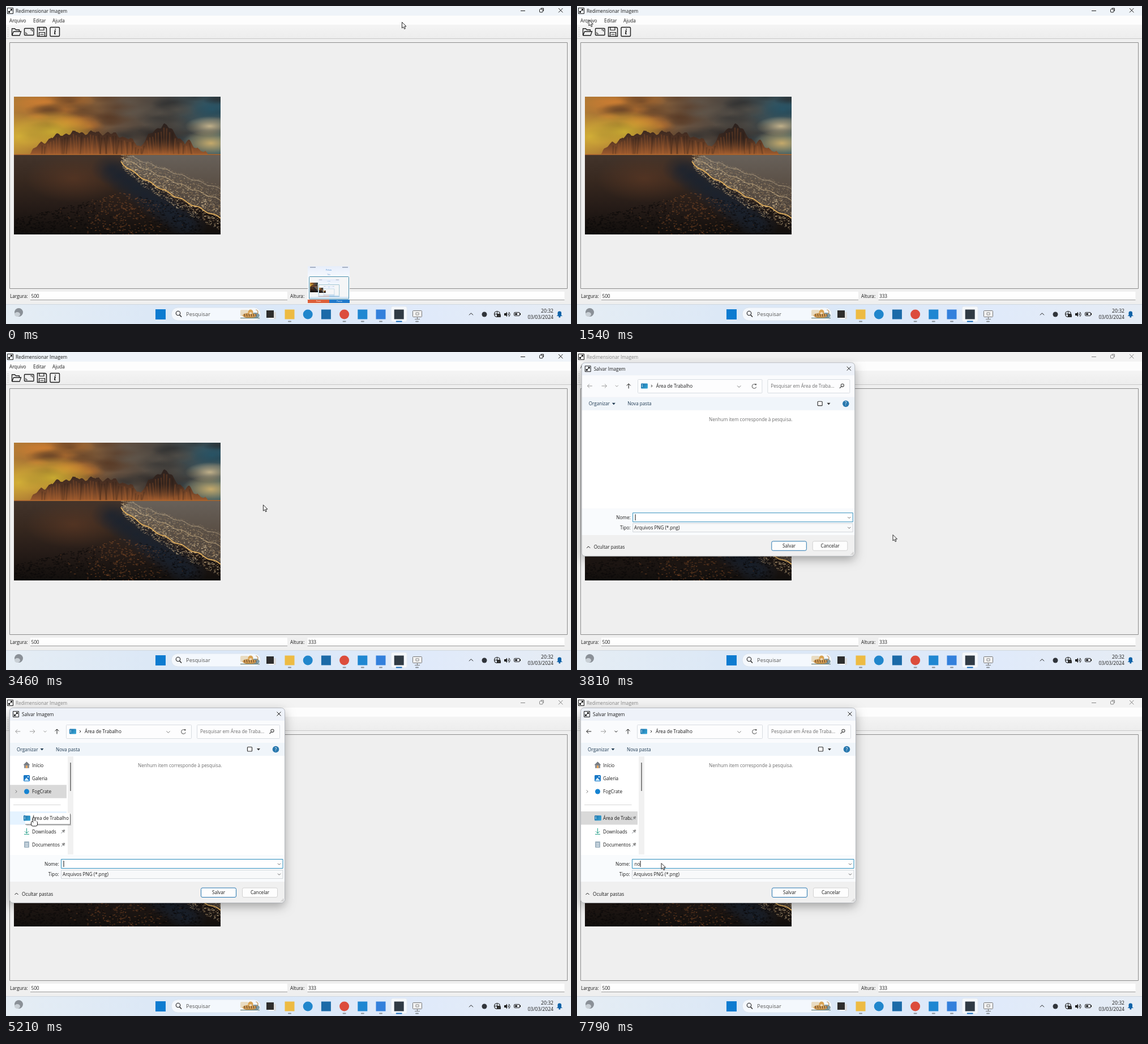
An HTML page with a canvas for the animation above (7.99 s loop, 998 by 561 pixels).

```html
<!DOCTYPE html>
<html lang="pt-BR">
<head>
<meta charset="utf-8">
<title>Redimensionar Imagem</title>
<style>
html, body { margin: 0; width: 100%; height: 100%; overflow: hidden; background: #f0f0f0; }
canvas { display: block; width: 100%; height: 100%; }
</style>
</head>
<body>
<canvas id="stage" width="998" height="561"></canvas>
<script>
let c = document.getElementById('stage').getContext('2d');
const LOOP = 7990, TAU = Math.PI * 2;
const FONT = '"Open Sans", "Noto Sans", sans-serif';
const INK = '#1b1b1b', GREY = '#8b8b8b';

const clamp = u => Math.min(1, Math.max(0, u));
const ease = u => u * u * (3 - 2 * u);
const rand = n => { const r = Math.sin(n * 127.1 + 11.7) * 43758.5453; return r - Math.floor(r); };

// Drawing helpers
function text(s, x, y, color = INK, size = 8.2, align = 'left') {
  c.font = size + 'px ' + FONT;
  c.textAlign = align;
  c.fillStyle = color;
  c.fillText(s, x, y);
}
function rect(x, y, w, h, color) {
  c.fillStyle = color;
  c.fillRect(x, y, w, h);
}
function box(x, y, w, h, r, fill, stroke, lw = 1) {
  c.beginPath();
  c.roundRect(x, y, w, h, r);
  if (fill) { c.fillStyle = fill; c.fill(); }
  if (stroke) { c.strokeStyle = stroke; c.lineWidth = lw; c.stroke(); }
}
function disc(x, y, rx, color, ry = rx) {
  c.beginPath();
  c.ellipse(x, y, rx, ry, 0, 0, TAU);
  c.fillStyle = color;
  c.fill();
}
function arc(x, y, r, color = INK, from = 0, to = TAU) {
  c.beginPath();
  c.arc(x, y, r, from, to);
  c.strokeStyle = color;
  c.lineWidth = 1.1;
  c.stroke();
}
function trace(p) {
  c.beginPath();
  for (let i = 0; i < p.length; i += 2) c.lineTo(p[i], p[i + 1]);
}
function line(p, color = INK, w = 1) {
  trace(p);
  c.strokeStyle = color;
  c.lineWidth = w;
  c.stroke();
}
function fill(p, color) {
  trace(p);
  c.fillStyle = color;
  c.fill();
}
function at(x, y, k, draw) {
  c.save();
  c.translate(x, y);
  c.scale(k, k);
  draw();
  c.restore();
}
function gradient(x0, y0, x1, y1, ...stops) {
  const g = c.createLinearGradient(x0, y0, x1, y1);
  stops.forEach((s, i) => g.addColorStop(i / (stops.length - 1), s));
  return g;
}
function glow(x, y, r, rgb, a, squash = .5) {
  c.save();
  c.translate(x, y);
  c.scale(1, squash);
  const g = c.createRadialGradient(0, 0, 0, 0, 0, r);
  g.addColorStop(0, `rgba(${rgb},${a})`);
  g.addColorStop(1, `rgba(${rgb},0)`);
  disc(0, 0, r, g);
  c.restore();
}
function chevron(x, y, color = INK, angle = 0, r = 2.5) {
  c.save();
  c.translate(x, y);
  c.rotate(angle);
  line([-r, -r / 2, 0, r / 2, r, -r / 2], color);
  c.restore();
}
function arrow(x, y, angle, len, color = INK) {
  c.save();
  c.translate(x, y);
  c.rotate(angle);
  line([-len / 2, 0, len / 2, 0], color);
  line([len / 2 - 3.5, -3.5, len / 2, 0, len / 2 - 3.5, 3.5], color);
  c.restore();
}
function cross(x, y, r, color = INK) {
  line([x - r, y - r, x + r, y + r], color);
  line([x + r, y - r, x - r, y + r], color);
}
function triangle(x, y, color) {
  fill([x - 3, y, x + 3, y, x, y + 3.5], color);
}

// Landscape, painted once in its own 365 x 243 space
const HORIZON = 102;
const ridge = x => {
  const massif = 38 * (1 - Math.abs((x - 132) / 105) ** 3);
  const peak = 52 * (1 - Math.abs((x - 264) / 52) ** 1.3);
  const foot = 22 * (1 - Math.abs((x - 308) / 32));
  const jag = 2.5 * Math.sin(x * .19) + 2 * Math.sin(x * .43) + rand(x) * 2;
  return HORIZON - Math.max(0, Math.max(massif, peak, foot) + jag);
};
const shore = u => 114 + 100 * u ** .8 + 1.5 * Math.sin(u * 38);
const reach = u => 12 + 45 * Math.sqrt(u);

function wave(lift, color, w) {
  c.beginPath();
  for (let u = 0; u <= 1.01; u += .02) c.lineTo(189 + 176 * u, shore(u) - lift * reach(u));
  c.strokeStyle = color;
  c.lineWidth = w;
  c.stroke();
}
function paintSky() {
  rect(0, 0, 365, HORIZON, gradient(0, 0, 365, 0, '#ad7935', '#9e662f', '#65503f', '#444341', '#315766'));
  for (let i = 0; i < 60; i++) {
    const x = rand(i) * 365, y = rand(i + .3) * 75;
    const warm = x < 190;
    const light = rand(i + .6) > .55;
    const tone = warm ? (light ? '212,128,50' : '86,56,36') : (light ? '96,88,78' : '42,43,44');
    glow(x, y, 22 + rand(i + .8) * 26, tone, .5, .35);
  }
  glow(70, 62, 75, '212,184,50', .85);
  glow(8, 70, 60, '218,184,56', .85, .7);
  glow(350, 22, 40, '38,86,106', .8);
  glow(346, 52, 44, '200,182,142', .95, .4);
  glow(348, 82, 52, '204,174,108', .95, .45);
}
function paintMountains() {
  c.beginPath();
  c.moveTo(28, HORIZON);
  for (let x = 28; x <= 342; x += 2) c.lineTo(x, ridge(x));
  c.lineTo(342, HORIZON);
  c.fillStyle = gradient(0, 45, 0, HORIZON, '#2a211f', '#4e3122', '#9c5a2e');
  c.fill();
  glow(262, 72, 50, '30,25,25', .75, .55);
  for (let x = 50; x < 320; x += 5) {
    const top = ridge(x);
    line([x, top + 6, x + 8 * rand(x + .5) - 4, HORIZON], rand(x) > .5 ? 'rgba(30,22,20,.22)' : 'rgba(185,105,52,.22)', 2.5);
  }
}
function paintBeach() {
  rect(0, HORIZON, 365, 142, gradient(0, HORIZON, 0, 243, '#43342b', '#37281f', '#251b17', '#110e0c'));
  glow(105, 144, 85, '98,58,36', .6);
  for (let s = 0; s < 10; s++) glow(172 + 15 * s, 128 + 11 * s, 36, '24,34,48', .7, .75);
  c.beginPath();
  c.moveTo(365, HORIZON + 1);
  c.lineTo(206, HORIZON + 1);
  for (let u = 0; u <= 1.01; u += .02) c.lineTo(189 + 176 * u, shore(u));
  c.fillStyle = gradient(0, HORIZON, 0, 210, '#68615a', '#5a4f45', '#493f38');
  c.fill();
}
function paintTexture() {
  for (let i = 0; i < 1500; i++) {
    const u = rand(i), v = rand(i + .37) * 1.4 - .4;
    const tone = rand(i + .7) > .5 ? '228,204,160' : '168,138,98';
    const a = .75 * (1 - Math.abs(v) * .7);
    rect(189 + 176 * u, shore(u) - v * reach(u), 1 + 2 * rand(i + .9), 1, `rgba(${tone},${a})`);
  }
  wave(0, '#dfad5c', 1.8);
  wave(.55, 'rgba(214,186,140,.5)', 1.5);
  wave(.9, 'rgba(206,184,150,.45)', 1.2);
  for (let i = 0; i < 1100; i++) {
    const x = rand(i + .2) * 330, depth = rand(i + .45);
    const y = 243 - depth * (75 - Math.abs(x - 190) * .25);
    const brown = rand(i + .6) < Math.exp(-(((x - 190) / 55) ** 2));
    rect(x, y, 1 + 3 * rand(i + .8), 1.4, brown ? 'rgba(146,84,42,.45)' : 'rgba(10,9,9,.6)');
  }
}
function makePhoto() {
  const layer = document.createElement('canvas'), stage = c;
  layer.width = 365;
  layer.height = 243;
  c = layer.getContext('2d');
  paintSky();
  paintMountains();
  paintBeach();
  paintTexture();
  rect(0, HORIZON - .7, 365, 1.4, '#bd702f');
  c = stage;
  return layer;
}
const photo = makePhoto();

// Icons
function resizeIcon(x, y) {
  box(x + .5, y + .5, 10, 10, 0, null, INK);
  line([x + 3, y + 8, x + 8, y + 3]);
  rect(x + 6, y + 2, 3, 3, INK);
  rect(x + 2, y + 6, 3, 3, INK);
}
function folderIcon() {
  line([1, 14, 1, 2, 6, 2, 8, 4, 14, 4, 14, 7], INK, 1.3);
  line([1, 14, 4, 7, 17, 7, 14.5, 14, 1, 14], INK, 1.3);
}
function floppyIcon() {
  box(1, 1, 16, 16, [0, 3, 0, 0], null, INK, 1.4);
  box(4.5, 1, 8, 5, 0, null, INK, 1.2);
  box(4, 10, 10, 7, 0, null, INK, 1.2);
  line([6, 13.5, 12, 13.5]);
}
function desktopIcon(x, y) {
  box(x, y, 12, 9, 1.2, gradient(x, y, x + 12, y + 9, '#1b6fa8', '#38a9d8'));
  for (const dy of [2, 4.5]) rect(x + 1.5, y + dy, 1.5, 1.5, '#d5f0fb');
}
function pin(x, y) {
  line([x - 3.5, y + 3.5, x, y], '#808890');
  line([x - 2, y - 2, x + 2, y + 2], GREY, 1.5);
  line([x, y, x + 2.5, y - 2.5], GREY, 3);
}

function mainWindow(active) {
  const ink = active ? INK : '#858585';
  rect(0, 0, 998, 561, '#efefef');
  rect(0, 0, 998, 17, active ? '#eff4f9' : '#f3f3f3');
  resizeIcon(2, 3);
  text('Redimensionar Imagem', 17, 11.5, ink);
  line([909, 8.5, 917, 8.5], ink);
  box(942.5, 5.5, 5.5, 5.5, 1, null, ink);
  line([944.5, 4, 949.5, 4, 949.5, 9], ink);
  cross(979.7, 7.7, 3.7, ink);

  rect(0, 17, 998, 16, '#fdfdfd');
  text('Arquivo', 6, 28.5);
  text('Editar', 48, 28.5);
  text('Ajuda', 82, 28.5);
  rect(0, 33, 998, 24, gradient(0, 33, 0, 57, '#f4f4f4', '#ededed'));
  rect(0, 57, 998, 1, '#c9c9c9');
  for (let y = 38; y < 54; y += 3) rect(3, y, 1, 1, '#aaa');
  at(9.5, 38, 1, folderIcon);
  box(32.5, 39.5, 16.5, 12, 1, null, INK, 1.4);
  line([35, 46, 35, 49, 38, 49]);
  line([43, 42, 46.5, 42, 46.5, 45]);
  at(54.5, 36.5, 1, floppyIcon);
  box(78, 37.5, 16.5, 16, 1.5, null, INK, 1.4);
  c.font = 'italic bold 12px "Noto Serif", serif';
  c.textAlign = 'center';
  c.fillStyle = INK;
  c.fillText('i', 86.3, 50);

  box(6.5, 64.5, 985, 434, 0, '#efefef', GREY);
  c.drawImage(photo, 14, 160);
  text('Largura:', 7, 514.5);
  text('Altura:', 502, 514.5);
  for (const [x, s] of [[43, '500'], [532.5, '333']]) {
    rect(x, 504, 454, 15, '#fefefe');
    rect(x, 518, 454, 1, '#999');
    text(s, x + 1.5, 514.5);
  }
}

function searchBox() {
  box(292, 532, 158, 23, 11.5, '#f4f8fd', '#dbe4ee');
  arc(304, 542, 3.7);
  line([306.7, 545, 310, 548.5], INK, 1.3);
  text('Pesquisar', 318, 547, '#555', 9.4);
  // Tiger resting on leaves
  box(414, 536, 14, 11, 2, '#e9dcc2');
  disc(440, 546, 8, '#7d9aa6', 5);
  disc(430, 546, 12, '#cf9a52', 4.5);
  disc(432, 540, 4.5, '#d8a252');
  disc(432, 542, 2.5, '#f2dfc0', 1.8);
  for (let x = 421; x < 442; x += 4) line([x, 543, x + 1, 548], '#5a3f2a');
  arc(441, 540, 4, '#b9803d', -1.5, 1.5);
  line([414, 550.5, 448, 550.5], '#4f6a60');
}
function tray() {
  chevron(821.5, 543.5, INK, Math.PI, 3.5);
  disc(845, 544, 4.5, '#30343a');
  arc(867.5, 543.5, 5);
  line([862.5, 543.5, 872.5, 543.5]);
  line([867.5, 538.5, 867.5, 548.5]);
  rect(868, 544, 6, 5, '#333');
  rect(880, 542, 3, 4, INK);
  fill([881, 544, 885, 539.5, 885, 548.5], INK);
  for (const r of [2, 4.5]) arc(885.5, 544, r, INK, -1, 1);
  box(897.5, 540.5, 10, 6, 1.5, null, INK);
  rect(899, 542, 4, 3, INK);
  rect(908, 542, 1, 3, INK);
  text('20:32', 967, 540.5, INK, 8.6, 'right');
  text('03/03/2024', 967, 551.5, INK, 8.6, 'right');
  box(974.5, 538.5, 6.5, 8, [3, 3, 0, 0], '#0e62a8');
  rect(973, 546, 9.5, 1, '#0e62a8');
  disc(977.8, 548, 1.7, '#0e62a8');
}
const APPS = ['#edbb43', '#2086cc', '#1b6aa8', '#dc4c3c', '#1f87d2', '#3380dc', '#303a44'];
const ROUND = [1, 3], IDLE = [1, 2];
function taskbar() {
  rect(0, 526, 998, 35, gradient(0, 0, 998, 0, '#e5edf4', '#dce8f6', '#dbe8f8', '#e0eafa', '#e6ecf4'));
  rect(0, 526, 998, 1, '#d0d8e0');
  disc(22.5, 540.5, 7.5, '#8a9097');
  disc(20, 544, 5, '#c9d0d6', 4);
  rect(264, 535, 18, 18, '#0d7bd0');
  searchBox();
  rect(464, 540, 13, 12, '#fafafa');
  rect(460, 537, 13, 13, '#2d2d2d');
  rect(473, 540, 4, 12, '#dcdcdc');

  APPS.forEach((color, i) => {
    const x = 501 + 32.2 * i, last = i === APPS.length - 1;
    if (last) box(x - 14, 530, 28, 27, 3, '#f5f8fc', '#e3e9f0');
    box(x - 8.5, 535.5, 17, 17, ROUND.includes(i) ? 8.5 : 0, color);
    const w = last ? 11 : 6;
    if (!IDLE.includes(i)) box(x - w / 2, 555.5, w, 2, 1, last ? '#1369b8' : '#888f96');
  });
  box(718.5, 537.5, 16, 11, 1, '#f2f2f2', '#777');
  box(724, 541, 5, 4, 0, null, '#888');
  line([726.5, 549, 726.5, 552], '#777');
  line([722, 552.5, 731, 552.5], '#777');
  box(723, 555.5, 6, 2, 1, '#888f96');
  tray();
}

// Small recorder window that shows itself inside its own screen
function preview(depth) {
  rect(0, 0, 74, 65, gradient(0, 0, 0, 21, '#e6edfa', '#f8fbff'));
  for (const x of [4, 61]) rect(x, 1.5, 10, 1, '#6b7892');
  text('Prévia', 37, 8, '#3f86cf', 3.6, 'center');
  text('Tela', 37, 16, '#6c9ed0', 3, 'center');
  box(2.5, 18.5, 70, 39.5, 1, '#f5f6f7', '#4b8fab');
  c.drawImage(photo, 4, 29, 15, 17);
  if (depth) at(18, 23, .52, () => preview(depth - 1));
  rect(3, 54, 69, 3, '#d6e7f5');
  rect(0, 59, 38, 6, '#dc5f39');
  rect(38, 59, 36, 6, '#2079cb');
  text('Parar', 19, 63.3, '#fff', 3.4, 'center');
  text('Pausa', 56, 63.3, '#fff', 3.4, 'center');
}
function recorder(t) {
  if (t >= 140) return;
  const u = clamp(t / 210);
  c.globalAlpha = 1 - u;
  at(533 + u * 15, 459 + u * 53, 1 - u * .4, () => preview(2));
  c.globalAlpha = 1;
}

function menu(t) {
  if (t < 2000 || t >= 3110) return;
  rect(4, 36, 116, 38, 'rgba(0,0,0,.18)');
  box(2.5, 34.5, 115, 37, 0, '#f2f2f2', '#9a9a9a');
  line([3, 72, 118, 72, 118, 35], '#777');
  if (t >= 2410) rect(3, t < 2900 ? 35 : 53, 111, 17.5, '#91c9f7');
  at(4, 38, .7, folderIcon);
  at(4, 54.5, .7, floppyIcon);
  ['Abrir', 'Salvar'].forEach((s, i) => {
    text(s, 25, 47 + 17.5 * i);
    text('Ctrl+' + 'OS'[i], 78, 47 + 17.5 * i);
  });
}

// Folder list of the dialog
const ROW = 23.4;
const rowY = i => 118.2 + ROW * i;
const PLACES = [
  ['Início', y => {
    rect(32, y - 1, 9, 6.5, '#8b9096');
    fill([30.5, y, 36.5, y - 6, 42.5, y], '#777c82');
    rect(35, y + 1, 3, 4.5, '#f1a85a');
  }],
  ['Galeria', y => {
    box(31, y - 5.5, 11, 11, 1.5, '#1878c6');
    fill([32, y + 4.5, 36, y - 1, 41, y + 4.5], '#cbeaff');
    disc(39, y - 2.5, 1.2, '#fff');
  }],
  ['FogCrate', y => {
    chevron(18, y, '#777', -Math.PI / 2);
    disc(36.5, y, 4.5, '#1583d1');
  }],
  null,
  ['Área de Trabalho', y => desktopIcon(31, y - 4.5)],
  ['Downloads', y => {
    arrow(36.5, y - 1, Math.PI / 2, 9, '#1f9c86');
    line([32, y + 5.2, 41, y + 5.2], '#1f9c86');
  }],
  ['Documentos', y => {
    box(32, y - 5.5, 9, 11, 1, '#a2b5c3');
    for (let k = -1; k < 2; k++) rect(34, y + 2.5 * k, 5, 1, '#eef5fa');
  }]
];
function navPane(t) {
  const opened = t >= 5490;
  const shade = (i, color) => rect(7, rowY(i) - ROW / 2, 100, ROW, color);
  rect(109, 103, 10, 173, '#f1f1f1');
  rect(113, 114, 2, 50, '#858585');
  if (!opened) shade(2, '#d9d9d9');
  if (t >= 4770) shade(4, !opened ? '#e5f3ff' : t < 6820 ? '#cce8ff' : '#d9d9d9');

  c.save();
  c.beginPath();
  c.rect(7, 103, 89.5, 173);
  c.clip();
  PLACES.forEach((place, i) => {
    const y = rowY(i);
    if (!place) return rect(13, 188, 90, 1, '#d8d8d8');
    place[1](y);
    text(place[0], 46, y + 3.4);
  });
  c.restore();
  for (let i = 4; i < 7; i++) pin(101, rowY(i));

  if (t >= 5210 && !opened) {
    rect(36, 206, 79, 19, 'rgba(0,0,0,.2)');
    rect(34, 203, 79.5, 20, '#fff');
    line([34, 223, 113.5, 223, 113.5, 204], '#777');
    desktopIcon(31, 207.5);
    text('Área de Trabalho', 46, 215);
  }
}

function dialogFrame() {
  c.save();
  c.shadowColor = 'rgba(0,0,0,.32)';
  c.shadowBlur = 18;
  c.shadowOffsetY = 6;
  box(6.5, 17.5, 486, 344, 6, '#f0f0f0');
  c.restore();
  box(6.5, 17.5, 486, 23, [6, 6, 0, 0], '#eef2f9');
  rect(6.5, 40, 486, 39, '#fafbfd');
  rect(6.5, 79, 486, 23, '#f0f5fa');
  rect(6.5, 102, 486, 175, '#fff');
  rect(6.5, 277, 486, 47, '#f9fbfd');
  box(6.5, 17.5, 486, 344, 6, null, '#a9adb3', .8);
  resizeIcon(12, 23);
  text('Salvar Imagem', 28, 31.5);
  cross(482, 28, 3.5);
}
function addressBar(t) {
  const back = t >= 5490 ? INK : '#999';
  arrow(21, 59, Math.PI, 8.5, back);
  arrow(46.5, 59, 0, 9, '#999');
  chevron(69, 59, back);
  arrow(90, 59.2, -Math.PI / 2, 8.5);
  box(106.5, 47.5, 221, 24, 1, '#fdfdfe', '#d8dce1');
  desktopIcon(112, 54.5);
  chevron(131, 59, INK, -Math.PI / 2, 2);
  text('Área de Trabalho', 139, 62);
  chevron(286.5, 60, '#777', 0, 3);
  arc(313.5, 59.5, 3.8, '#666', .3, 5.4);
  rect(315, 55, 2.5, 2.5, '#666');
  box(337.5, 47.5, 146, 24, 1, '#fdfdfe', '#d8dce1');
  text('Pesquisar em Área de Traba...', 343, 62, '#6d6d6d');
  arc(470.5, 57.8, 2.6, '#444');
  line([468.6, 59.8, 465.5, 63], '#444', 1.2);

  text('Organizar', 19, 93.7, '#1f3a52');
  triangle(63.5, 89, '#1f3a52');
  text('Nova pasta', 88, 93.7, '#1f3a52');
  box(426.5, 86.5, 8, 7.5, 1, '#fff', '#333', 1.2);
  triangle(446, 89, '#333');
  disc(476.5, 90.5, 5.8, '#2878ae');
  text('?', 476.5, 93.6, '#fff', 8.2, 'center');
}
function caretOn(t) {
  if (t < 5490) return t < 4430 || t >= 4960;
  return t >= 6820 && (t < 7370 || t >= 7510);
}
function fields(t) {
  const focus = t < 5490 || t >= 6820;
  text('Nome:', 93.5, 296, INK, 8.2, 'right');
  text('Tipo:', 93.5, 314.2, INK, 8.2, 'right');
  box(97.5, 284.5, 391.5, 16, 0, '#fff', focus ? '#2f8fbd' : GREY);
  box(97.5, 303.5, 391.5, 15, 0, '#f8f9fa', '#d3d7db');
  chevron(482.5, 293, '#666');
  chevron(482.5, 311, '#666');
  text('Arquivos PNG (*.png)', 100, 314.2);
  const name = 'no'.slice(0, (t >= 7510) + (t >= 7720));
  text(name, 101.5, 295.7);
  if (caretOn(t)) rect(101.5 + c.measureText(name).width, 287, 1, 11, '#111');
}
function button(s, x, edge) {
  box(x, 335, 62, 16.5, 2.5, '#fdfdfd', edge);
  text(s, x + 31, 346.3, INK, 8.2, 'center');
}
function dialog(t) {
  const u = clamp((t - 3670) / 210);
  if (!u) return;
  const k = 1 - .2 * (1 - u) ** 3;
  c.globalAlpha = clamp(u * 2);
  at(249.5 * (1 - k), 189 * (1 - k), k, () => {
    dialogFrame();
    addressBar(t);
    text('Nenhum item corresponde à pesquisa.', 233, 122, '#6d6d6d');
    if (t >= 3950) navPane(t);
    fields(t);
    chevron(18.5, 345.5, INK, Math.PI, 3);
    text('Ocultar pastas', 28, 348.5);
    button('Salvar', 344.5, '#2877b0');
    button('Cancelar', 417.5, '#d2d2d2');
    for (let i = 0; i < 3; i++) rect(485 + i * 2, 358 - i * 2, 1, 1 + i * 2, '#bbb');
  });
  c.globalAlpha = 1;
}

// Pointer moves: start, end, x, y
const MOVES = [
  [0, 910, 145, 312], [910, 1540, 20.5, 24], [2200, 2690, 33.5, 39], [2760, 2970, 35, 56],
  [3110, 3600, 557.5, 322], [4020, 4790, 46, 210], [5840, 6190, 147, 282], [6540, 6680, 148.5, 291]
];
function pointer(t) {
  let x = 699, y = 28;
  for (const [from, to, tx, ty] of MOVES) {
    const e = ease(clamp((t - from) / (to - from)));
    x += (tx - x) * e;
    y += (ty - y) * e;
  }
  at(x, y, 1, t >= 4790 && t < 5840 ? hand : arrowhead);
}
function hand() {
  box(-1.5, 7, 11, 9, 3, '#fff', INK);
  box(1.7, .5, 3.2, 10, 1.6, '#fff', INK);
  rect(2.3, 7, 6, 5, '#fff');
}
function arrowhead() {
  trace([.5, .5, .5, 11, 3, 8.8, 4.7, 12.6, 6.4, 11.8, 4.8, 8, 8, 8]);
  c.closePath();
  c.fillStyle = '#fff';
  c.fill();
  c.strokeStyle = '#111';
  c.lineWidth = .9;
  c.stroke();
}

function draw(t) {
  mainWindow(t < 3670);
  taskbar();
  recorder(t);
  menu(t);
  dialog(t);
  pointer(t);
}
let start;
function tick(now) {
  start ??= now;
  const t = Math.max(0, now - start) % LOOP, shift = t < 2000 ? 0 : 30;
  draw(Math.max(0, t - (t - shift) % 70));
  requestAnimationFrame(tick);
}
draw(0);
requestAnimationFrame(tick);
</script>
</body>
</html>
```
